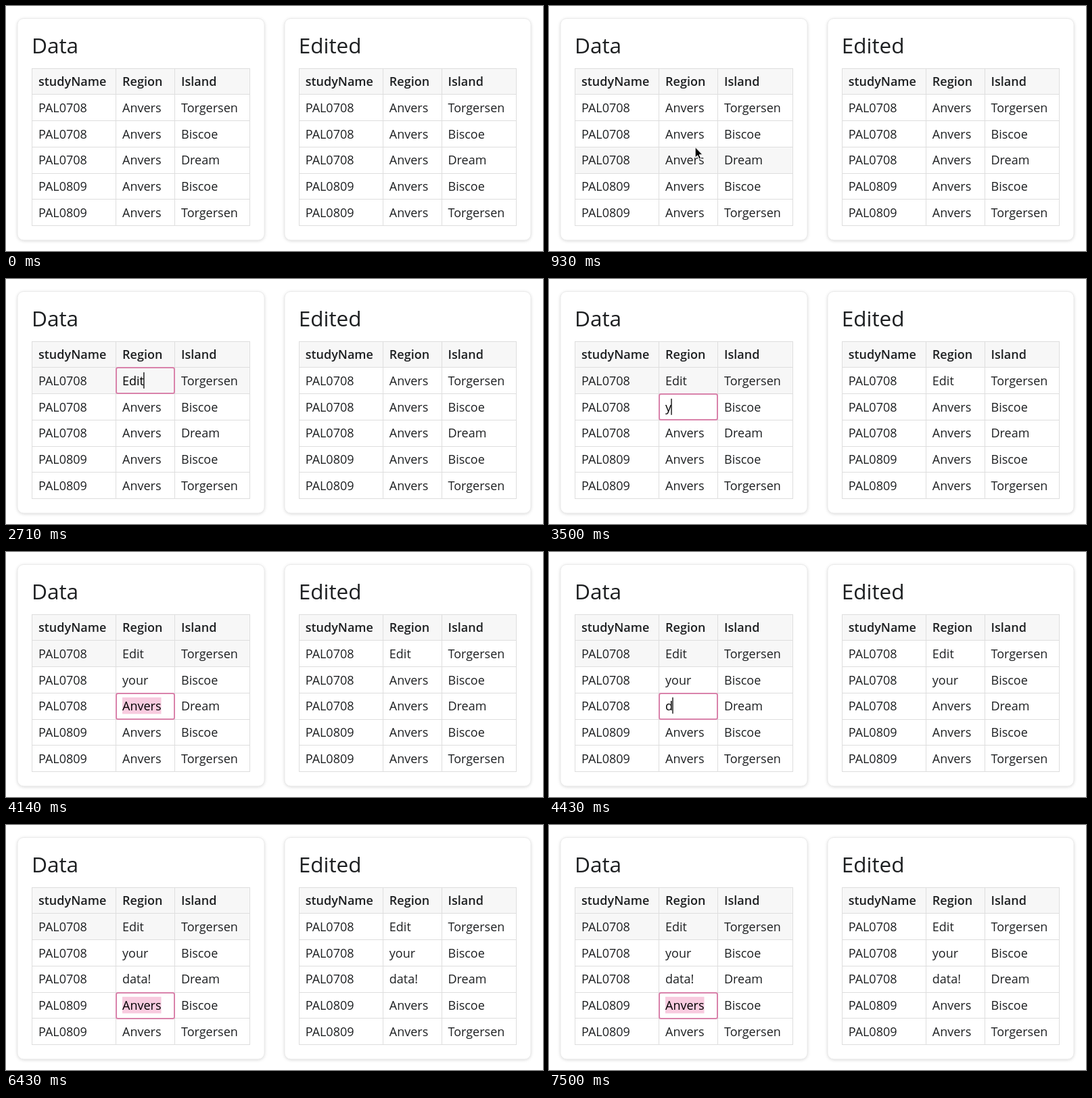
Recreate the animation shown at these times as an HTML page. Size 794 px wide and 362 px high, loop 8.08 s.

```html
<!DOCTYPE html>
<html lang="en">
<head>
<meta charset="utf-8">
<title>Editable table</title>
<style>
  html, body { margin: 0; width: 100%; height: 100%; overflow: hidden; background: #fff; }
  svg { display: block; width: 794px; height: 362px; font-family: "Open Sans", sans-serif; }
  text { font-size: 18px; fill: #1d1f21; white-space: pre; }
  .title { font-size: 31.5px; }
  .head { font-weight: 600; }
  .card { fill: #fff; stroke: #ebebeb; filter: drop-shadow(0 1px 2px rgba(0, 0, 0, .14)); }
  .band { fill: #f7f7f7; }
  .grid { fill: none; stroke: #dedede; }
  .box { fill: none; stroke: #d983ab; stroke-width: 2; }
  .mark { fill: #f8cbdf; }
</style>
</head>
<body>
<svg id="stage" viewBox="0 0 794 362"></svg>
<script>
const LOOP = 8080;
const stage = document.getElementById('stage');
const lines = [92.5, 130.5, 169.5, 208.5, 247.5, 285.5, 324.5];
const baselines = [118, 157, 196, 234, 273, 312];
const table = [
  ['studyName', 'Region', 'Island'],
  ['PAL0708', 'Anvers', 'Torgersen'],
  ['PAL0708', 'Anvers', 'Biscoe'],
  ['PAL0708', 'Anvers', 'Dream'],
  ['PAL0809', 'Anvers', 'Biscoe'],
  ['PAL0809', 'Anvers', 'Torgersen']
];

// One entry per edited cell: when it opens, its keystrokes, when each table shows the value
const edits = [
  { row: 1, open: 1360, word: 'Edit', keys: [2000, 2430, 2570, 2710], close: 3210, sync: 3290 },
  { row: 2, open: 3210, word: 'your', keys: [3430, 3640, 3710, 4000], close: 4140, sync: 4210 },
  { row: 3, open: 4140, word: 'data!', keys: [4430, 4570, 4640, 4790, 5000], close: 5640, sync: 5640 },
  { row: 4, open: 5640, word: '', keys: [], close: LOOP, sync: LOOP }
];

function add(tag, attrs, parent = stage, content = '') {
  const el = document.createElementNS('http://www.w3.org/2000/svg', tag);
  for (const name in attrs) el.setAttribute(name, attrs[name]);
  el.textContent = content;
  parent.appendChild(el);
  return el;
}

function set(el, attrs) {
  for (const name in attrs) el.setAttribute(name, attrs[name]);
}

function show(el, on) {
  el.setAttribute('visibility', on ? 'visible' : 'hidden');
}

function panel(title, cardX, cardW, cols, textX) {
  add('rect', { class: 'card', x: cardX, y: 18.5, width: cardW, height: 327.5, rx: 9 });
  add('text', { class: 'title', x: textX[0] - 10, y: 70 }, stage, title);
  const left = cols[0], right = cols[3], width = right - left;
  add('rect', { class: 'band', x: left, y: lines[0], width, height: 38 });
  const hover = add('rect', { class: 'band', x: left, width, visibility: 'hidden' });
  const d = lines.map(y => `M${left - .5} ${y}H${right + .5}`).join('') +
    cols.map(x => `M${x} ${lines[0]}V${lines[6]}`).join('');
  add('path', { class: 'grid', d });
  const mark = add('rect', { class: 'mark', height: 24.5, visibility: 'hidden' });
  const cells = table.map((row, r) => row.map((word, c) =>
    add('text', { class: r ? 'cell' : 'head', x: textX[c], y: baselines[r] }, stage, word)));
  return { cells, hover, mark };
}

const data = panel('Data', 17, 365, [38.5, 162.5, 249.5, 360.5], [48, 172, 259]);
const edited = panel('Edited', 412, 364, [433.5, 557.5, 644.5, 754.5], [442.7, 566.8, 653.5]);

const box = add('rect', { class: 'box', x: 163, width: 86, height: 38, rx: 2.5 });
const caret = add('rect', { width: 1.3, height: 24, fill: '#000' });
const arrow = add('path', {
  d: 'M0 0V15.5L3.6 12.2L6 17.6L8.5 16.5L6.1 11.2H11Z',
  fill: '#000', stroke: '#fff', 'stroke-linejoin': 'round'
});
const beam = add('g', { transform: 'translate(213 158)', fill: 'none' });
const beamPath = 'M-3.6 -7.5Q-.6 -7.5 0 -5.8Q.6 -7.5 3.6 -7.5M0 -5.8V5.8M-3.6 7.5Q-.6 7.5 0 5.8Q.6 7.5 3.6 7.5M-2 3H2';
add('path', { d: beamPath, stroke: '#fff', 'stroke-width': 3 }, beam);
add('path', { d: beamPath, stroke: '#000', 'stroke-width': 1.3 }, beam);

function write(el, word) {
  if (el.textContent !== word) el.textContent = word;
}

// The pointer glides up in twelve steps and rests on the first cell
function pointer(t) {
  const u = Math.min(12, Math.floor((t - 430) / 70) + 1) / 12;
  const ease = u * u * (3 - 2 * u);
  return { x: 228 - 16 * ease, y: 356 - 199 * ease };
}

function drawPointer(t) {
  const p = pointer(t);
  set(arrow, { transform: `translate(${p.x} ${p.y})` });
  show(arrow, t >= 430 && t < 1430);
  show(beam, t >= 1430 && t < 2000);
  const row = t < 430 ? -1 : lines.findIndex((y, i) => i > 0 && p.y >= y && p.y < lines[i + 1]);
  show(data.hover, row > 0);
  if (row > 0) set(data.hover, { y: lines[row], height: lines[row + 1] - lines[row] });
}

function drawEdits(t) {
  let active = null;
  for (const e of edits) {
    const cell = data.cells[e.row][1];
    const typed = e.keys.filter(k => t >= k).length;
    const open = t >= e.open && t < e.close;
    write(cell, typed ? e.word.slice(0, typed) : 'Anvers');
    write(edited.cells[e.row][1], t >= e.sync ? e.word : 'Anvers');
    cell.style.fill = open ? '#000' : '';
    if (open) active = { cell, typed, row: e.row, last: e.keys[typed - 1] };
  }
  show(box, active);
  show(data.mark, active && !active.typed);
  show(caret, active && active.typed && t - active.last < 500);
  if (!active) return;
  const top = baselines[active.row] - 19.2;
  const width = active.cell.getComputedTextLength();
  set(box, { y: lines[active.row] + .5 });
  set(data.mark, { x: 172, y: top, width });
  set(caret, { x: 171.3 + width, y: top });
}

function draw(t) {
  drawPointer(t);
  drawEdits(t);
}

const start = performance.now();
function tick() {
  draw((performance.now() - start) % LOOP);
  requestAnimationFrame(tick);
}
tick();
</script>
</body>
</html>
```
